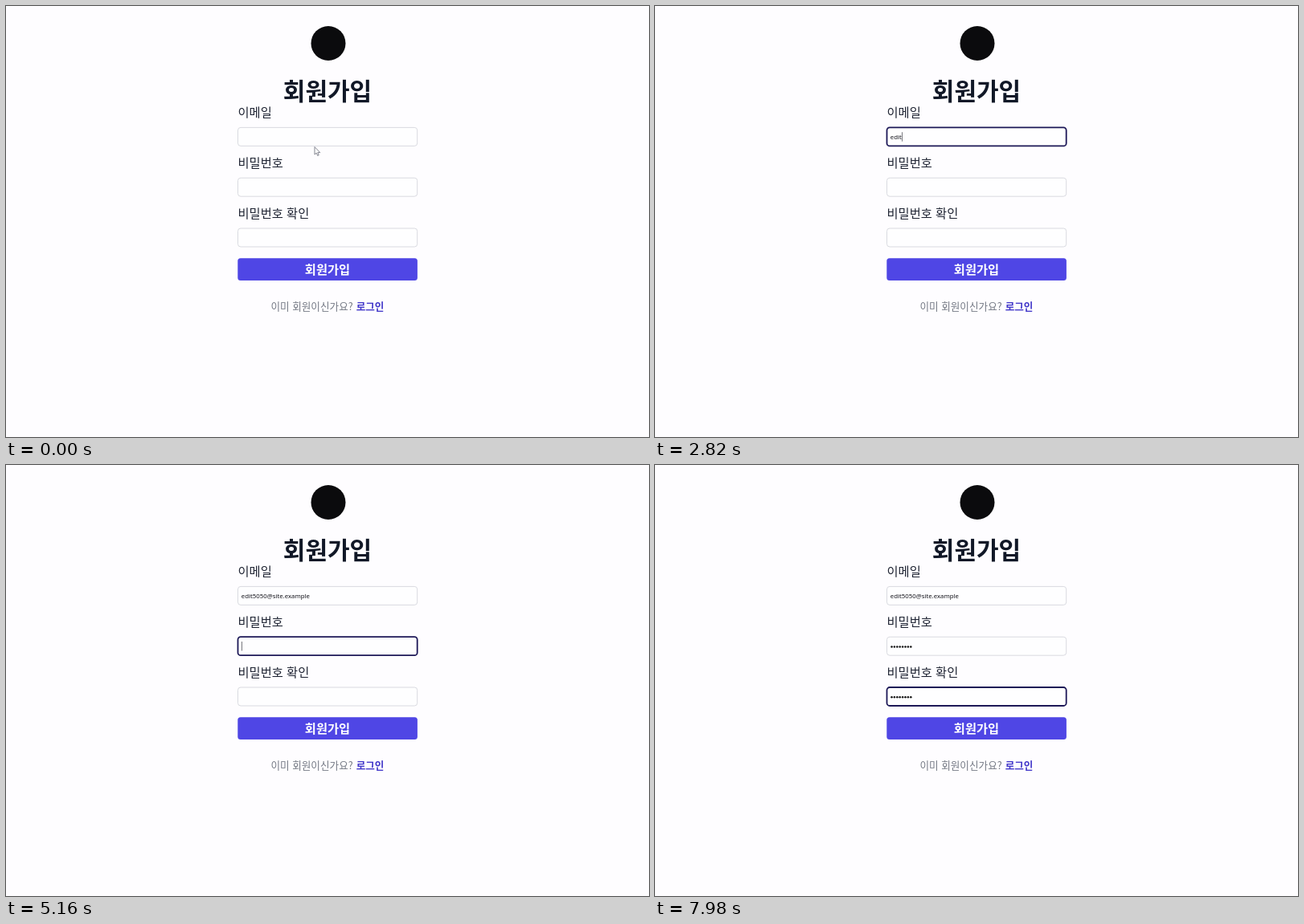
Recreate the animation shown at these times as an HTML page. Size 800 by 537 pixels, loop 8000 ms.

```html
<!DOCTYPE html>
<html lang="ko">
<head>
<meta charset="utf-8">
<title>회원가입</title>
<style>
  html, body { margin: 0; width: 100%; height: 100%; overflow: hidden; background: #fefdff; }
  svg { display: block; width: 800px; height: 537px; }
  text { font-family: "Noto Sans CJK KR", "Noto Sans CJK", sans-serif; }
  .title { font-size: 30px; font-weight: 700; fill: #111827; }
  .label { font-size: 15.3px; fill: #1f2433; }
  .button { font-size: 15.3px; font-weight: 700; fill: #fff; }
  .note { font-size: 12.6px; fill: #747984; }
  .link { font-weight: 700; fill: #4338ca; }
  .mail { font: 7.8px "Noto Sans", "Open Sans", sans-serif; fill: #15151c; white-space: pre; }
  .box { fill: #fefeff; stroke: #d9dae0; stroke-width: 1; }
  .box.focus { stroke: #1d1857; stroke-width: 1.8; }
  .dots { fill: #111; }
</style>
</head>
<body>
<svg id="stage" viewBox="0 0 800 537">
  <circle cx="401" cy="46.5" r="21.5" fill="#0b0b0d"/>
  <text class="title" x="400" y="117" text-anchor="middle">회원가입</text>
  <text class="label" x="288.5" y="138">이메일</text>
  <text class="label" x="288.5" y="201">비밀번호</text>
  <text class="label" x="288.5" y="263.5">비밀번호 확인</text>
  <g id="fields"></g>
  <rect x="288.3" y="314.2" width="223.6" height="27.8" rx="3.5" fill="#4f46e5"/>
  <text class="button" x="400" y="333.7" text-anchor="middle">회원가입</text>
  <text class="note" x="329.5" y="378.5">이미 회원이신가요?</text>
  <text class="note link" x="435.7" y="378.5">로그인</text>
  <text id="mail" class="mail" x="292.8" y="166"></text>
  <rect id="caret" width="0.8" height="11.5" fill="#55555e"/>
  <path id="pointer" d="M0 0V9.6L2.2 7.6L3.7 11L5.2 10.3L3.8 7.1H6.8Z"
        fill="#fff" stroke="#777985" stroke-width="0.9" stroke-linejoin="round"/>
</svg>
<script>
const LOOP = 8000, LEFT = 292.8, DOT = 3.4;
const TOPS = [151.4, 214.2, 277];
const ADDRESS = "edit5050@site.example";
const byId = id => document.getElementById(id);
const mail = byId("mail"), caret = byId("caret"), pointer = byId("pointer");

function add(parent, name, attrs) {
  const el = document.createElementNS("http://www.w3.org/2000/svg", name);
  for (const k in attrs) el.setAttribute(k, attrs[k]);
  return parent.appendChild(el);
}

const fields = TOPS.map((y, i) => {
  const g = byId("fields");
  const box = add(g, "rect", { class: "box", x: 288.5, y, width: 223.2, height: 23, rx: 3.5 });
  const dots = [];
  for (let n = 0; i > 0 && n < 8; n++)
    dots.push(add(g, "circle", { class: "dots", cx: LEFT + DOT * (n + 0.5), cy: y + 12.2, r: 1.25 }));
  return { box, dots };
});

// [time, focused field, characters typed in it]
const TYPED = [
  [0, -1, 0], [180, 0, 0],
  [1920, 0, 1], [1980, 0, 2], [2100, 0, 3], [2160, 0, 4],
  [2940, 0, 5], [3000, 0, 6], [3180, 0, 7], [3240, 0, 8],
  [3780, 0, 9], [3840, 0, 11], [3900, 0, 12], [3960, 0, 13],
  [4140, 0, 14], [4260, 0, 15], [4320, 0, 16], [4440, 0, 17],
  [4680, 0, 18], [4860, 0, 19], [4920, 0, 20], [4980, 0, 21],
  [5160, 1, 0], [5700, 1, 1], [5760, 1, 2], [5880, 1, 4],
  [6240, 1, 5], [6300, 1, 6], [6420, 1, 8],
  [6540, 2, 0], [6900, 2, 1], [6960, 2, 2], [7080, 2, 3], [7140, 2, 4],
  [7440, 2, 5], [7500, 2, 6], [7620, 2, 7], [7680, 2, 8]
];
// spans in which the caret has blinked off
const OFF = [[480, 780], [1140, 1440], [1740, 1920], [2520, 2820], [3540, 3780], [5460, 5700], [7980, 8000]];
const POINTER = [[0, 384, 175.5], [60, 384, 171]];
const POINTER_END = 120;

const at = (table, t) => table.findLast(row => row[0] <= t);

function draw(t) {
  const [, focus, count] = at(TYPED, t);
  const lengths = [ADDRESS.length, 8, 8].map((full, i) => i < focus ? full : i === focus ? count : 0);
  mail.textContent = ADDRESS.slice(0, lengths[0]);
  fields.forEach(({ box, dots }, i) => {
    box.classList.toggle("focus", i === focus);
    dots.forEach((d, n) => d.setAttribute("visibility", n < lengths[i] ? "visible" : "hidden"));
  });

  const lit = focus >= 0 && !OFF.some(([a, b]) => t >= a && t < b);
  caret.setAttribute("visibility", lit ? "visible" : "hidden");
  if (lit) {
    const width = focus ? count * DOT : count ? mail.getComputedTextLength() : 0;
    caret.setAttribute("x", LEFT + width + 0.2);
    caret.setAttribute("y", TOPS[focus] + 5.8);
  }

  const [, x, y] = at(POINTER, t);
  pointer.setAttribute("transform", `translate(${x} ${y})`);
  pointer.setAttribute("visibility", t < POINTER_END ? "visible" : "hidden");
}

const start = performance.now();
function tick(now) {
  draw(Math.max(0, now - start) % LOOP);
  requestAnimationFrame(tick);
}
draw(0);
requestAnimationFrame(tick);
</script>
</body>
</html>
```
